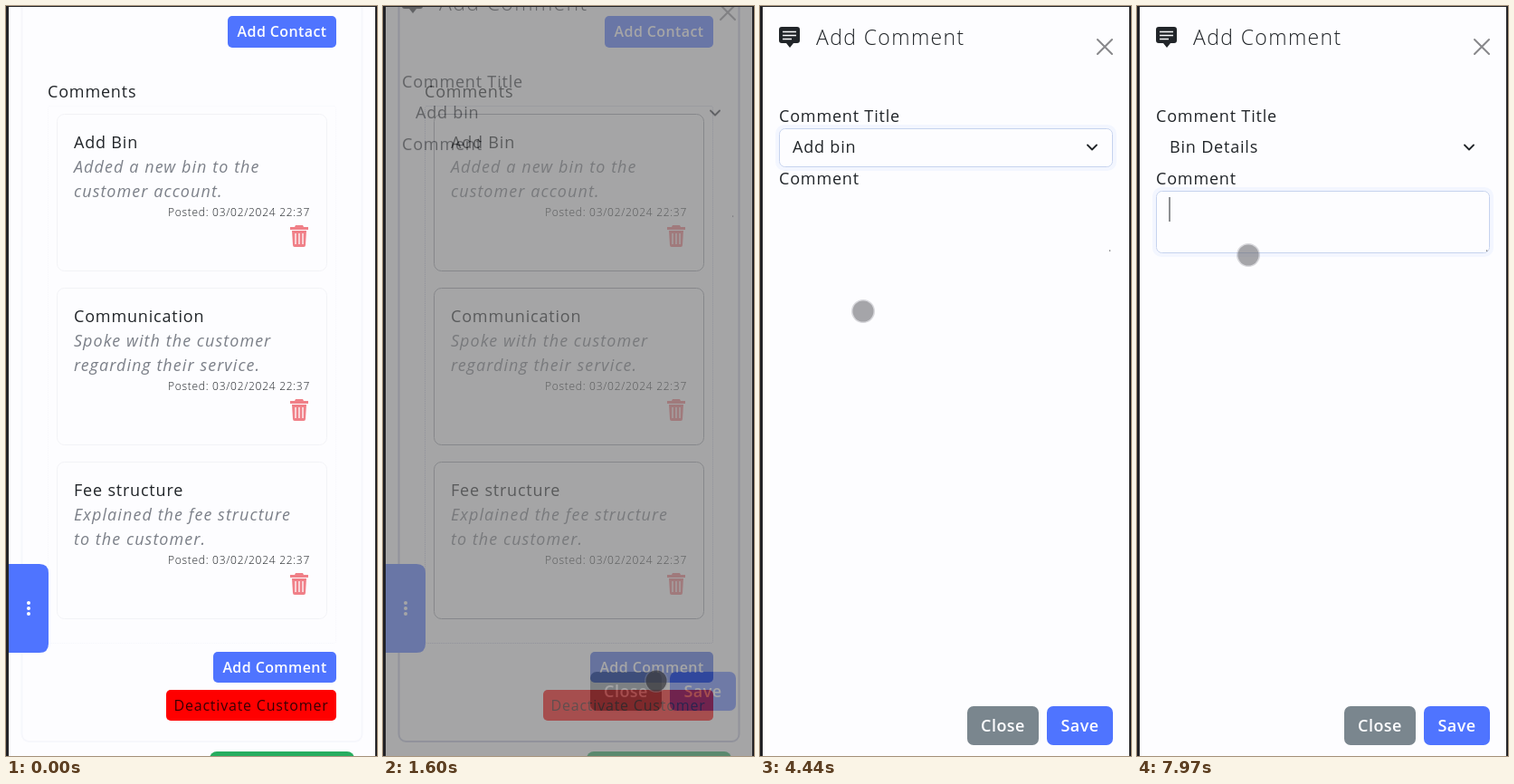
These frames come from a looping animation (410 by 828 pixels, 8000 ms). An HTML page:

```html
<!DOCTYPE html>
<html lang="en">
<head>
<meta charset="utf-8">
<title>Add comment</title>
<style>
  html, body { margin: 0; width: 100%; height: 100%; overflow: hidden; background: #fdfdff; }
  svg { display: block; width: 410px; height: 828px; }
  text { font-family: "Open Sans", "Noto Sans", sans-serif; letter-spacing: .045em; fill: #212529; white-space: pre; }
  .note { font-style: italic; letter-spacing: .06em; fill: #7c8089; }
  .date { font-weight: 300; letter-spacing: .06em; text-anchor: end; }
  .heading { font-weight: 300; letter-spacing: .06em; }
  .label { font-weight: 600; letter-spacing: .025em; text-anchor: middle; }
  .plain { font-weight: 400; letter-spacing: .05em; }
  .line { fill: none; stroke: #c4c8e0; }
</style>
</head>
<body>
<svg id="stage" viewBox="0 0 410 828"></svg>
<script>
const LOOP = 8000;
const stage = document.getElementById('stage');

function add(parent, tag, attrs = {}, content = '') {
  const el = document.createElementNS('http://www.w3.org/2000/svg', tag);
  for (const name in attrs) el.setAttribute(name, attrs[name]);
  el.textContent = content;
  parent.append(el);
  return el;
}
const group = (parent, attrs) => add(parent, 'g', attrs);
const rect = (parent, x, y, width, height, rx, attrs) =>
  add(parent, 'rect', { x, y, width, height, rx, ...attrs });
const path = (parent, d, attrs) => add(parent, 'path', { d, fill: 'none', ...attrs });
const text = (parent, x, y, size, content, attrs) =>
  add(parent, 'text', { x, y, 'font-size': size, ...attrs }, content);

const PAPER = '#fdfdff', INK = '#212529', BLUE = '#4f74ff', EDGE = '#222226';

function button(parent, x, y, w, h, label, size, fill, ink = PAPER, style = 'label') {
  const box = rect(parent, x, y, w, h, size > 16 ? 7 : 5, { fill });
  text(parent, x + w / 2, y + h / 2 + size * .35, size, label, { class: style, style: `fill:${ink}` });
  return box;
}

// steps: [time, value, easing?]; the first and last values are held to the loop's ends
function animate(el, prop, steps, easing = 'linear') {
  const frames = steps.map(([time, value, ease]) =>
    ({ offset: time / LOOP, [prop]: value, easing: ease || easing }));
  if (steps[0][0] > 0) frames.unshift({ ...frames[0], offset: 0, easing: 'linear' });
  if (steps.at(-1)[0] < LOOP) frames.push({ ...frames.at(-1), offset: 1 });
  el.animate(frames, { duration: LOOP, iterations: Infinity });
}
const toggle = (el, ...steps) => animate(el, 'opacity', steps, 'steps(1, end)');

const CLICK = 1400, MODAL = 1555, PICK = 6400, FOCUS = 7460;

// Customer page
const page = group(stage);
rect(page, 0, 0, 410, 828, 0, { fill: PAPER });
const lines = group(page, { class: 'line' });
rect(lines, 17.5, -20, 376, 832, 8, { 'stroke-width': 2 });
rect(lines, 46.5, 110.5, 318, 593, 2, { 'stroke-dasharray': '1 1' });
animate(lines, 'opacity', [[CLICK, .12], [CLICK + 90, 1]]);

button(page, 245, 11, 120, 35, 'Add Contact', 16, BLUE);
text(page, 46, 101, 18, 'Comments');

const comments = [
  ['Add Bin', 'Added a new bin to the', 'customer account.'],
  ['Communication', 'Spoke with the customer', 'regarding their service.'],
  ['Fee structure', 'Explained the fee structure', 'to the customer.']
];
comments.forEach(([title, first, second], i) => {
  const y = i * 192;
  rect(lines, 56.5, 119.5 + y, 298, 173, 8, { stroke: '#a4a8b4' });
  const card = group(page, { transform: `translate(0 ${y})` });
  text(card, 75, 157, 18, title);
  text(card, 75, 184, 18, first, { class: 'note' });
  text(card, 75, 211, 18, second, { class: 'note' });
  text(card, 336, 232, 12, 'Posted: 03/02/2024 22:37', { class: 'date' });
  path(card, 'M314 244h5l1-2h8l1 2h5v3h-20zM316 248h16l-1 16q0 2-2 2h-10q-2 0-2-2z', { style: 'fill:#f08088' });
  path(card, 'M320 251v12M324 251v12M328 251v12', { stroke: PAPER, 'stroke-width': 1.3 });
});

path(page, 'M3 616h34q10 0 10 10v78q0 10-10 10H3z', { style: `fill:${BLUE}` });
for (const y of [659, 665, 671]) add(page, 'circle', { cx: 25, cy: y, r: 2, fill: PAPER });

const addComment = button(page, 229, 713, 136, 34, 'Add Comment', 16, BLUE);
animate(addComment, 'fill', [[1250, BLUE], [1400, '#4063d4'], [1900, BLUE]]);
button(page, 177, 755, 188, 34, 'Deactivate Customer', 16, '#f00', '#380004', 'label plain');
rect(page, 225, 823, 160, 40, 8, { fill: '#26ad5f' });

const backdrop = rect(stage, 0, 0, 410, 828, 0, { fill: '#000' });
animate(backdrop, 'opacity', [[CLICK, 0], [CLICK + 150, .5]]);

// Dialog
const modal = group(stage);
animate(modal, 'opacity', [[MODAL, 0], [MODAL + 150, 1]]);
animate(modal, 'transform', [[MODAL, 'translate(0px, -50px)', 'ease-out'], [MODAL + 300, 'translate(0px, 0px)']]);
rect(modal, 0, 0, 410, 880, 0, { fill: PAPER });

path(modal, 'M24 23h17q3 0 3 3v12q0 3-3 3h-4l-4 5-4-5h-5q-3 0-3-3V26q0-3 3-3z', { style: `fill:${INK}` });
path(modal, 'M25 28.5h15M25 32.5h15M25 36.5h10', { stroke: PAPER, 'stroke-width': 1.7 });
text(modal, 62, 43, 23, 'Add Comment', { class: 'heading' });
path(modal, 'M373 37l16 16m0-16l-16 16', { stroke: '#87878b', 'stroke-width': 2, 'stroke-linecap': 'round' });

text(modal, 21, 128, 18, 'Comment Title');
text(modal, 21, 197, 18, 'Comment');

function focusRing(y, h) {
  const ring = group(modal, { fill: 'none' });
  rect(ring, 19, y - 2, 373, h + 4, 8, { stroke: '#5f8cff', 'stroke-width': 4, 'stroke-opacity': .06 });
  rect(ring, 21.5, y + .5, 368, h - 1, 6, { stroke: '#c6d3ee' });
  return ring;
}
animate(focusRing(135, 43), 'opacity', [[2650, 0], [2800, 1], [FOCUS - 60, 1], [FOCUS, 0]]);
animate(focusRing(204, 69), 'opacity', [[FOCUS, 0], [FOCUS + 150, 1]]);

toggle(text(modal, 36, 162, 18, 'Add bin'), [0, 1], [PICK, 0]);
toggle(text(modal, 36, 162, 18, 'Bin Details'), [0, 0], [PICK, 1]);
path(modal, 'M362 153.5l5 5 5-5', { stroke: INK, 'stroke-width': 1.8, 'stroke-linecap': 'round', 'stroke-linejoin': 'round' });
rect(modal, 386, 269.5, 1.2, 1.2, 0, { fill: '#55555a' });
toggle(rect(modal, 35.5, 211, 1, 27, 0, { fill: INK }), [0, 0], [FOCUS, 1]);

button(modal, 229, 773, 79, 43, 'Close', 18, '#7a868e');
button(modal, 317, 773, 73, 43, 'Save', 18, BLUE);

// Pointer: a soft touch dot over the page, an arrow over the open list
const pointer = group(stage);
const spots = [
  [600, 330, 850], [1200, 302, 745], [1950, 302, 745], [2500, 160, 160], [2750, 160, 160],
  [3240, 150, 314], [3700, 150, 314], [4300, 114, 337], [4700, 114, 337], [5500, 90, 160],
  [5970, 84, 272], [6500, 84, 272], [7250, 123, 250], [7700, 123, 275]
];
animate(pointer, 'transform', spots.map(([time, x, y]) => [time, `translate(${x}px, ${y}px)`]), 'ease-in-out');

const dot = group(pointer);
add(dot, 'circle', { r: 13, fill: '#909098', 'fill-opacity': .35 });
const core = add(dot, 'circle', { r: 11.5, fill: '#303034' });
animate(core, 'opacity', [[1300, .3], [CLICK, .65], [1600, .65], [1720, .3]]);
toggle(dot, [0, 1], [2760, 0], [3900, 1], [5560, 0], [6520, 1]);

const arrow = path(pointer, 'M.5.5v16l3.8-3.6 2.6 5.8 2.4-1-2.5-5.7h5z', { style: `fill:${PAPER}`, stroke: INK });
toggle(arrow, [0, 0], [2760, 1], [3900, 0], [5560, 1], [6520, 0]);

// Window edges
rect(stage, 0, 0, 3, 828, 0, { fill: EDGE });
rect(stage, 408, 0, 2, 828, 0, { fill: EDGE });
rect(stage, 0, 0, 410, 1, 0, { fill: EDGE });
</script>
</body>
</html>
```
